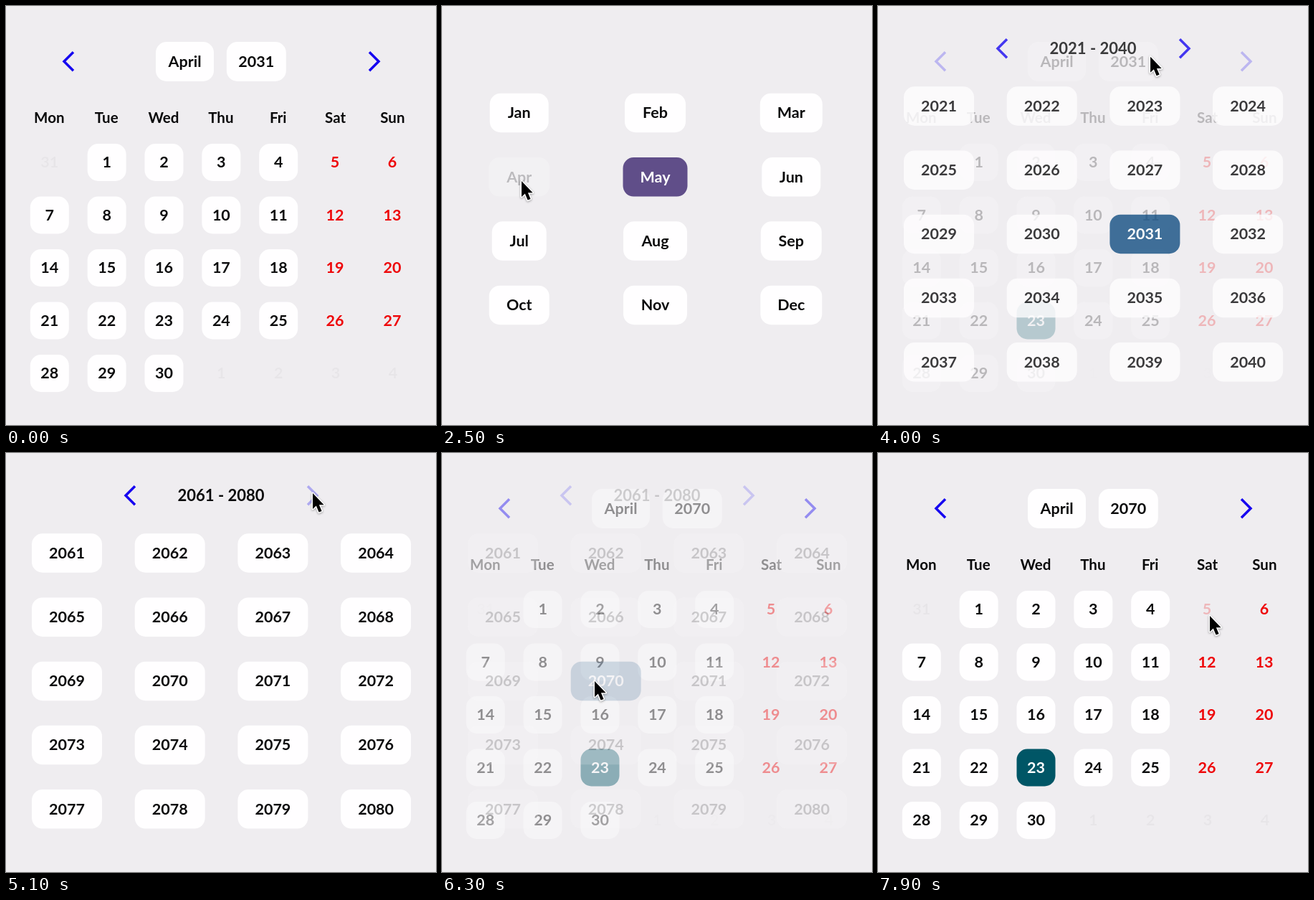
An HTML page with a canvas that plays this animation: 600 by 584 pixels, repeating every 8000 ms.

```html
<!DOCTYPE html>
<html lang="en">
<head>
<meta charset="utf-8">
<title>Calendar picker</title>
<style>
html, body { margin: 0; width: 100%; height: 100%; overflow: hidden; background: #efedf0; }
canvas { display: block; width: 600px; height: 584px; }
</style>
</head>
<body>
<canvas id="stage"></canvas>
<script>
const W = 600, H = 584, LOOP = 8000;
const BG = '#efedf0', WHITE = '#fffeff', INK = '#0a0a0b', RED = '#ee0508', BLUE = '#1606f0';
const PURPLE = '#604e89', TEAL = '#005666', NAVY = '#0f4c81';
const DAYS = ['Mon', 'Tue', 'Wed', 'Thu', 'Fri', 'Sat', 'Sun'];
const MONTHS = ['Jan', 'Feb', 'Mar', 'Apr', 'May', 'Jun', 'Jul', 'Aug', 'Sep', 'Oct', 'Nov', 'Dec'];
const MONTH_W = [82, 85, 87, 85, 90, 82, 76, 89, 85, 84, 89, 86];

const dpr = window.devicePixelRatio || 1;
const stage = document.getElementById('stage');
const layer = document.createElement('canvas');
for (const c of [stage, layer]) {
  c.width = W * dpr;
  c.height = H * dpr;
}
const out = stage.getContext('2d');
const g = layer.getContext('2d');

// Touch feedback: [down, up] times per control
const PRESSES = {
  month: [[850, 1350]],
  apr: [[2350, 2690]],
  year: [[3450, 3600]],
  next: [[4480, 4590], [4960, 5080]],
  pick: [[5800, 5900]],
  day5: [[7720, 9000]]
};

// View opacity keys: [start, duration, shown]
const CAL = [[1340, 430, 0], [2790, 500, 1], [3670, 430, 0], [6160, 600, 1]];
const MONTH_VIEW = [[1350, 600, 1], [2720, 400, 0]];
const YEAR_VIEW = [[3680, 600, 1], [5940, 435, 0]];

// Pointer path: [time, x, y]
const PATH = [
  [100, 527, 458], [250, 527, 458], [480, 87, 300], [800, 250, 84], [1580, 250, 84],
  [1800, 195, 150], [2200, 110, 243], [2800, 110, 243], [3300, 339, 82], [3780, 339, 82],
  [4250, 427, 55], [5250, 427, 55], [5650, 212, 317], [7000, 212, 317],
  [7200, 209, 272], [7640, 462, 226], [8000, 462, 226]
];

const clamp = v => Math.max(0, Math.min(1, v));
const smooth = v => v * v * (3 - 2 * v);
const easeOut = v => 1 - (1 - v) * (1 - v);

function touch(name, t) {
  let a = 1;
  for (const [down, up] of PRESSES[name]) {
    if (t < down) break;
    a = 1 - 0.77 * clamp((t - down) / 100);
    if (t > up) a += (1 - a) * clamp((t - up) / 250);
  }
  return a;
}

function fade(keys, start, t) {
  let a = start;
  for (const [from, span, shown] of keys) {
    if (t < from) break;
    const p = clamp((t - from) / span);
    a = shown ? easeOut(p) : 1 - p;
  }
  return a;
}

function text(s, x, y, color = INK, size = 21.5) {
  g.font = `700 ${size}px Lato, "Open Sans", sans-serif`;
  g.fillStyle = color;
  g.fillText(s, x, y + size * 0.36);
}

function box(x, y, w, h, color) {
  g.fillStyle = color;
  g.beginPath();
  g.roundRect(x - w / 2, y - h / 2, w, h, 15);
  g.fill();
}

function button(s, x, y, w, h, fill, alpha = 1) {
  g.globalAlpha = alpha;
  box(x, y, w, h, fill || WHITE);
  text(s, x, y - 0.5, fill ? '#fff' : INK);
  g.globalAlpha = 1;
}

function chevron(x, y, dir, alpha = 1) {
  g.globalAlpha = alpha;
  g.strokeStyle = BLUE;
  g.lineWidth = 3.5;
  g.beginPath();
  g.moveTo(x - dir * 6.5, y - 13);
  g.lineTo(x + dir * 6.5, y);
  g.lineTo(x - dir * 6.5, y + 13);
  g.stroke();
  g.globalAlpha = 1;
}

function calendar(t) {
  chevron(87.5, 77.3, -1);
  chevron(513.5, 77.3, 1);
  button('April', 249.5, 77.5, 81, 55, null, touch('month', t));
  button(t < 5900 ? '2031' : '2070', 349.3, 77.5, 83, 55, null, touch('year', t));
  DAYS.forEach((d, i) => text(d, 60.3 + i * 79.85, 156, INK, 20.5));
  for (let i = 0; i < 35; i++) {
    const col = i % 7, x = 60.8 + col * 79.85, y = 218 + Math.floor(i / 7) * 73.5;
    if (i < 1 || i > 30) {
      g.globalAlpha = 0.03;
      text(i ? i - 30 : 31, x, y - 0.5);
      g.globalAlpha = 1;
    } else if (col > 4) {
      g.globalAlpha = i === 5 ? touch('day5', t) : 1;
      text(i, x - 1, y - 0.5, RED);
      g.globalAlpha = 1;
    } else {
      button(i, x, y, 54, 52, i === 23 && t >= 2700 ? TEAL : null);
    }
  }
}

function months(t) {
  const chosen = t < 2700 ? 4 : 3;
  MONTHS.forEach((m, i) => {
    const x = 107.7 + (i % 3) * 189.8, y = 149 + Math.floor(i / 3) * 89.3;
    button(m, x, y, MONTH_W[i], 54.5, i === chosen ? PURPLE : null, i === 3 ? touch('apr', t) : 1);
  });
}

function years(t) {
  const first = t < 4590 ? 2021 : t < 5080 ? 2041 : 2061;
  const chosen = t < 5900 ? 2031 : 2070;
  chevron(173.5, 59.3, -1);
  chevron(427.5, 59.3, 1, touch('next', t));
  text(`${first} - ${first + 19}`, 300, 59, INK, 22);
  for (let i = 0; i < 20; i++) {
    const n = first + i, x = 85 + (i % 4) * 143.7, y = 139.5 + Math.floor(i / 4) * 89.2;
    button(n, x, y, 98, 54.5, n === chosen ? NAVY : null, n === 2070 ? touch('pick', t) : 1);
  }
}

function view(draw, alpha, t) {
  if (alpha <= 0) return;
  g.setTransform(dpr, 0, 0, dpr, 0, 0);
  g.clearRect(0, 0, W, H);
  g.textAlign = 'center';
  draw(t);
  out.globalAlpha = alpha;
  out.drawImage(layer, 0, 0, W, H);
  out.globalAlpha = 1;
}

function pointer(t) {
  if (t < PATH[0][0]) return;
  let i = 0;
  while (i < PATH.length - 2 && t >= PATH[i + 1][0]) i++;
  const [t0, x0, y0] = PATH[i], [t1, x1, y1] = PATH[i + 1];
  const p = smooth(clamp((t - t0) / (t1 - t0)));
  out.save();
  out.translate(x0 + (x1 - x0) * p + 1, y0 + (y1 - y0) * p + 1);
  const shape = new Path2D('M0 0V22L4.8 17.6L8.6 26.6L12.6 24.9L8.9 16.2H15.6Z');
  out.lineJoin = 'round';
  out.lineWidth = 3;
  out.strokeStyle = '#fff';
  out.shadowColor = 'rgba(0,0,0,.35)';
  out.shadowBlur = 3 * dpr;
  out.shadowOffsetY = dpr;
  out.stroke(shape);
  out.shadowColor = 'transparent';
  out.fillStyle = '#000';
  out.fill(shape);
  out.restore();
}

const origin = performance.now();
function frame(now) {
  const t = Math.max(0, now - origin) % LOOP;
  out.setTransform(dpr, 0, 0, dpr, 0, 0);
  out.fillStyle = BG;
  out.fillRect(0, 0, W, H);
  view(calendar, fade(CAL, 1, t), t);
  view(months, fade(MONTH_VIEW, 0, t), t);
  view(years, fade(YEAR_VIEW, 0, t), t);
  pointer(t);
  requestAnimationFrame(frame);
}
frame(origin);
</script>
</body>
</html>
```
